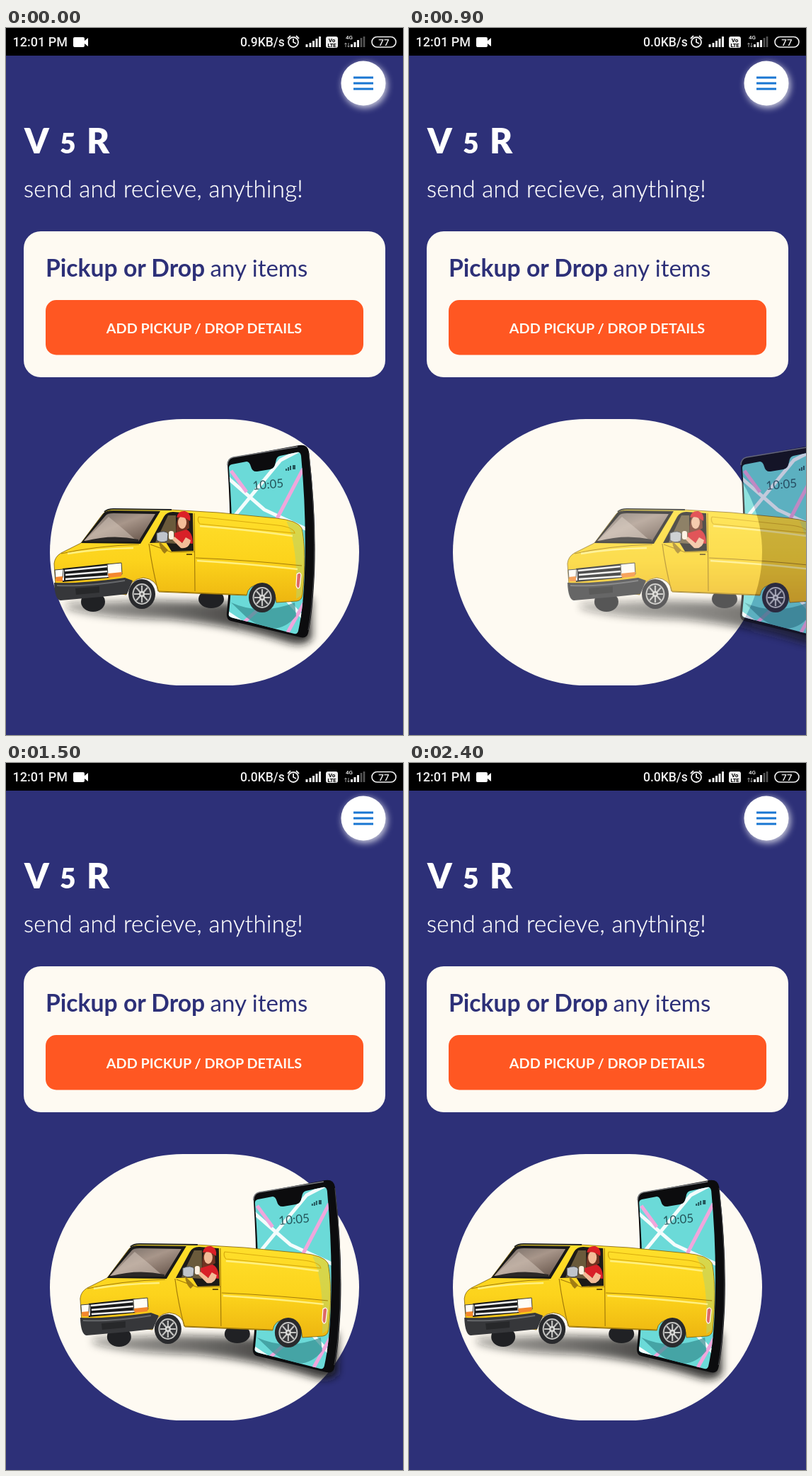
An HTML page for the animation above (2.5 s loop, 561 by 998 pixels).

```html
<!DOCTYPE html>
<html lang="en">
<head>
<meta charset="utf-8">
<title>Pickup and drop</title>
<style>
html, body { margin: 0; width: 100%; height: 100%; overflow: hidden; background: #2d3078; }
svg { display: block; width: 561px; height: 998px; }
text { font-family: Lato, sans-serif; }
.bar text { font-family: Roboto, sans-serif; font-weight: 500; fill: #eee; }
</style>
</head>
<body>
<svg viewBox="0 0 561 998">
  <defs>
    <filter id="soft" x="-30%" y="-60%" width="160%" height="220%"><feGaussianBlur stdDeviation="6"/></filter>
    <filter id="glow" x="-40%" y="-40%" width="180%" height="180%"><feGaussianBlur stdDeviation="5"/></filter>
    <linearGradient id="paint" x1="0" y1="0" x2="0" y2="1">
      <stop offset="0" stop-color="#ffe02c"/><stop offset=".55" stop-color="#fcd31c"/><stop offset="1" stop-color="#edb510"/>
    </linearGradient>
    <linearGradient id="glass" x1="0" y1="0" x2="1" y2="1">
      <stop offset="0" stop-color="#6e6661"/><stop offset=".45" stop-color="#a8968a"/><stop offset="1" stop-color="#5c4a40"/>
    </linearGradient>
    <linearGradient id="shade">
      <stop offset="0" stop-color="#161616" stop-opacity=".4"/><stop offset="1" stop-color="#161616" stop-opacity=".9"/>
    </linearGradient>
    <path id="screen" d="M315 621Q315 617 319 616L340 612Q344 612 346 619Q348 627 355 626L373 623Q380 622 381 613Q382 605 387 604L411 599Q416 598 417 604Q425 690 422 770Q420 820 413 851Q412 856 407 855L318 832Q314 831 315 826Q324 740 315 621Z"/>
    <clipPath id="map"><use href="#screen"/></clipPath>
    <g id="wheel">
      <ellipse rx="19" ry="21" fill="#292a2d"/>
      <ellipse rx="13.5" ry="15" fill="#c4c4c2"/>
      <ellipse rx="11.5" ry="13" fill="#36373a"/>
      <path d="M0-12V12M-11 0H11M-8-9L8 9M8-9L-8 9" stroke="#c4c4c2" stroke-width="2.2"/>
      <circle r="4" fill="#dcdcda"/><circle r="1.8" fill="#555"/>
    </g>
  </defs>

  <rect width="561" height="998" fill="#2d3078"/>
  <g class="bar">
    <rect width="561" height="39"/>
    <text x="9.5" y="26" font-size="18">12:01 PM</text>
    <path d="M97 13H109Q111 13 111 15V18L116 14V26L111 22V25Q111 27 109 27H97Q95 27 95 25V15Q95 13 97 13Z" fill="#fff"/>
    <text id="speed" x="331" y="26" font-size="17.5"></text>
    <g fill="none" stroke="#eee" stroke-width="1.8">
      <circle cx="406" cy="20" r="7"/>
      <path d="M406 15V20L410 22M398 15L402 11M410 11L414 15"/>
      <rect x="517" y="12.5" width="34" height="14.5" rx="7.2" stroke-width="1.6"/>
    </g>
    <path d="M425 27V23M430 27V21M434.5 27V18M439 27V15M443.5 27V12M488.5 27V23M493 27V20M497.5 27V17" stroke="#eee" stroke-width="3"/>
    <path d="M502 27V14M506 27V12" stroke="#555" stroke-width="2.6"/>
    <path d="M480 21V27M484 27V21M478.5 23L480 21L481.5 23M482.5 25L484 27L485.5 25" fill="none" stroke="#999"/>
    <rect x="452" y="12" width="17" height="16" rx="3" fill="#eee"/>
    <g text-anchor="middle">
      <text x="460.5" y="19.5" font-size="8" style="fill:#000;font-weight:700">Vo</text>
      <text x="460.5" y="27" font-size="7.5" style="fill:#000;font-weight:700">LTE</text>
      <text x="485" y="16" font-size="8">4G</text>
      <text x="534" y="24.5" font-size="13.5">77</text>
    </g>
  </g>

  <circle cx="507" cy="81" r="32" fill="#fff" opacity=".75" filter="url(#glow)"/>
  <circle cx="505" cy="78" r="31.5" fill="#fff"/>
  <path d="M491 70H519M491 78H519M491 86H519" stroke="#1976d2" stroke-width="3"/>

  <g fill="#fff">
    <text y="177" font-size="49" font-weight="900"><tspan x="26">V</tspan><tspan x="76" font-size="39">5</tspan><tspan x="114">R</tspan></text>
    <text x="25" y="239" font-size="33" font-weight="300" letter-spacing=".35" stroke="#fff" stroke-width=".3">send and recieve, anything!</text>
  </g>

  <rect x="25" y="287" width="511" height="206" rx="24" fill="#fefaf2"/>
  <g fill="#2d3078">
    <text x="56" y="351" font-size="33.7" font-weight="700">Pickup or Drop</text>
    <text x="288.5" y="351" font-size="33.1">any items</text>
  </g>
  <rect x="56" y="384" width="449" height="77.5" rx="15" fill="#ff5722"/>
  <text x="280" y="431" font-size="19.8" font-weight="700" fill="#fefaf2" text-anchor="middle">ADD PICKUP / DROP DETAILS</text>

  <rect x="62" y="552" width="437" height="376" rx="188" fill="#fefaf2"/>

  <g id="art">
    <path d="M86 812L210 808L330 812L432 804V862Q420 875 394 866Q320 843 230 835Q130 833 86 820Z" fill="url(#shade)" filter="url(#soft)"/>
    <!-- phone -->
    <path d="M313 616Q313 608 321 606L414 589Q426 587 428 598Q439 690 436 770Q433 830 427 854Q425 862 416 860L318 837Q311 835 312 826Q321 740 313 616Z" fill="#0c0c0e"/>
    <path d="M313 617Q313 608 321 606L412 591" fill="none" stroke="#77797d" stroke-width="1.5"/>
    <path d="M428 600Q438 690 435 770Q432 825 427 850" fill="none" stroke="#45464a"/>
    <use href="#screen" fill="#6bdad8"/>
    <g clip-path="url(#map)" fill="none" stroke="#f4fcfc" stroke-width="5">
      <path d="M310 632L365 680L430 710M322 690L388 610L415 596M305 820L350 850M390 800L422 835"/>
      <path d="M378 702L420 622M318 625L340 655M335 840L385 795M397 855L425 805" stroke="#f0a6dc"/>
      <path d="M318 811Q360 830 408 811L410 830Q382 864 340 832Z" fill="#368e91" stroke="none" opacity=".7"/>
    </g>
    <text transform="translate(349 652) rotate(-5)" font-size="17" fill="#24565b">10:05</text>
    <path d="M396 625V622M399 625V620M402 624V618" stroke="#24565b" stroke-width="2"/>
    <rect x="405" y="617" width="4" height="6" fill="#24565b"/>

    <!-- van -->
    <ellipse cx="123" cy="810" rx="17" ry="14" fill="#202124"/>
    <ellipse cx="290" cy="806" rx="18" ry="13" fill="#202124"/>
    <path d="M68 756Q69 746 78 741L106 727L136 687Q141 680 152 679L232 680L300 684L382 692Q412 695 418 706Q425 740 419 800Q418 808 411 809L382 811Q380 786 360 785Q342 786 340 801L216 796Q213 778 194 776Q174 778 170 800L70 786Z" fill="url(#paint)" stroke="#7a5b0a" stroke-width=".8"/>
    <path d="M396 696Q414 698 418 708Q424 745 418 800L410 806Q413 730 396 696Z" fill="#b9d36b" opacity=".55"/>
    <path d="M106 727L138 685Q141 681 152 681L218 682L190 728Z" fill="#191919"/>
    <path d="M110 724L141 688Q143 685 152 685L211 686L187 725Z" fill="url(#glass)"/>
    <path d="M112 723L145 690Q165 706 185 724Z" fill="#d7c9bd" opacity=".5"/>
    <path d="M112 724Q150 714 187 722V725H112Z" fill="#2b2827"/>
    <path d="M139 683Q143 679 152 679L234 680" fill="none" stroke="#292a24" stroke-width="2"/>
    <path d="M203 727L223 690Q227 683 236 683L264 685L265 738L234 739L226 726Z" fill="#1d1b18"/>
    <path d="M211 726L229 688H240V728Z" fill="#6a5a3b"/>

    <!-- driver -->
    <path d="M243 690Q239 704 241 718L252 710L259 706L258 689Z" fill="#713321"/>
    <ellipse cx="249" cy="698" rx="6" ry="9" fill="#f3bc98"/>
    <path d="M241 691Q243 681 253 682Q262 685 260 696Q251 688 241 691Z" fill="#dc2027"/>
    <path d="M238 713L255 708Q264 712 264 728L239 725Z" fill="#d82028"/>
    <path d="M261 723Q259 736 247 734L235 722L238 718L249 727L254 719Z" fill="#f3bc98"/>
    <rect x="230" y="710" width="7" height="12" rx="3" fill="#fff0df"/>
    <path d="M213 713Q225 708 229 714L228 724Q219 728 213 723Z" fill="#bfc4cb" stroke="#44484e"/>
    <path d="M216 724L229 737L224 742Q217 736 216 724Z" fill="#a07d15"/>

    <!-- body lines -->
    <g fill="none" stroke="#a47c09" stroke-width="1.2">
      <path d="M202 728Q206 760 215 795M266 685L267 795M204 729L234 740L266 739"/>
      <path d="M272 690L384 702Q407 705 408 713L274 700Q270 696 272 690" stroke="#d9ac0e"/>
      <path d="M268 748Q340 751 418 759M78 742Q128 731 188 729"/>
      <path d="M216 795L340 800"/>
    </g>
    <path d="M274 703Q340 708 405 717M270 752Q340 756 412 764M87 742Q130 735 180 734" fill="none" stroke="#fff080" stroke-width="2.5"/>
    <path d="M255 743H263" stroke="#6a5208" stroke-width="2"/>
    <path d="M411 771Q416 767 417 772L415 789Q412 794 410 787Z" fill="#dd6a67" stroke="#fff" stroke-width="1.2"/>

    <!-- front -->
    <path d="M80 763L146 756L147 776L80 782Z" fill="#191a1c"/>
    <path d="M83 766L143 760M84 772L143 767M84 778L143 774" stroke="#f3f3f2" stroke-width="2.6"/>
    <path d="M81 765V780M144 758V775" stroke="#f3f3f2" stroke-width="2"/>
    <path d="M143 757L163 755L164 771L144 773Z" fill="#fffdf6" stroke="#403f3a"/>
    <path d="M144 770L164 768L163 774L145 776Z" fill="#f4872e"/>
    <path d="M69 765L81 764L80 776L70 777Z" fill="#fffdf6" stroke="#403f3a"/>
    <path d="M70 775L80 774V781L71 781Z" fill="#f4872e"/>
    <path d="M68 783Q100 785 168 776L179 780L171 799L134 803L77 808Q69 807 68 783Z" fill="#36373a"/>
    <path d="M72 787Q110 789 168 780" fill="none" stroke="#66686b" stroke-width="2"/>
    <path d="M98 791L132 788V797L99 800Z" fill="#27282a"/>
    <use href="#wheel" x="192" y="799"/>
    <use href="#wheel" x="362" y="804"/>
  </g>
</svg>
<script>
const art = document.getElementById('art');
const speed = document.getElementById('speed');
const LOOP = 2500, STEP = 100;
const START = 370, SLIDE = 4200, FADE = 700, TRAVEL = 187;

const cubic = (a, b, c, d, s) =>
  a * (1 - s) ** 3 + 3 * b * s * (1 - s) ** 2 + 3 * c * s * s * (1 - s) + d * s ** 3;

// y of a Bezier curve at x, found by halving
function curve(xs, ys, x) {
  let lo = 0, hi = 1;
  for (let i = 0; i < 24; i++) {
    const mid = (lo + hi) / 2;
    if (cubic(...xs, mid) < x) lo = mid; else hi = mid;
  }
  return cubic(...ys, lo);
}

// Emphasized ease: slow start, quick middle, long tail
const ease = x => x < 1 / 6
  ? curve([0, .05, .1333, 1 / 6], [0, 0, .06, .4], x)
  : curve([1 / 6, .2083, .25, 1], [.4, .82, 1, 1], x);

function draw(now) {
  const t = Math.floor(now % LOOP / STEP) * STEP;
  const run = t - START;
  const resting = run < 0; // end of the previous slide
  art.setAttribute('transform', `translate(${resting ? 0 : TRAVEL * (1 - ease(run / SLIDE))} 0)`);
  art.setAttribute('opacity', resting ? 1 : Math.min(1, run / FADE));
  speed.textContent = t < 700 ? '0.9KB/s' : '0.0KB/s';
  requestAnimationFrame(draw);
}
draw(performance.now());
</script>
</body>
</html>
```
